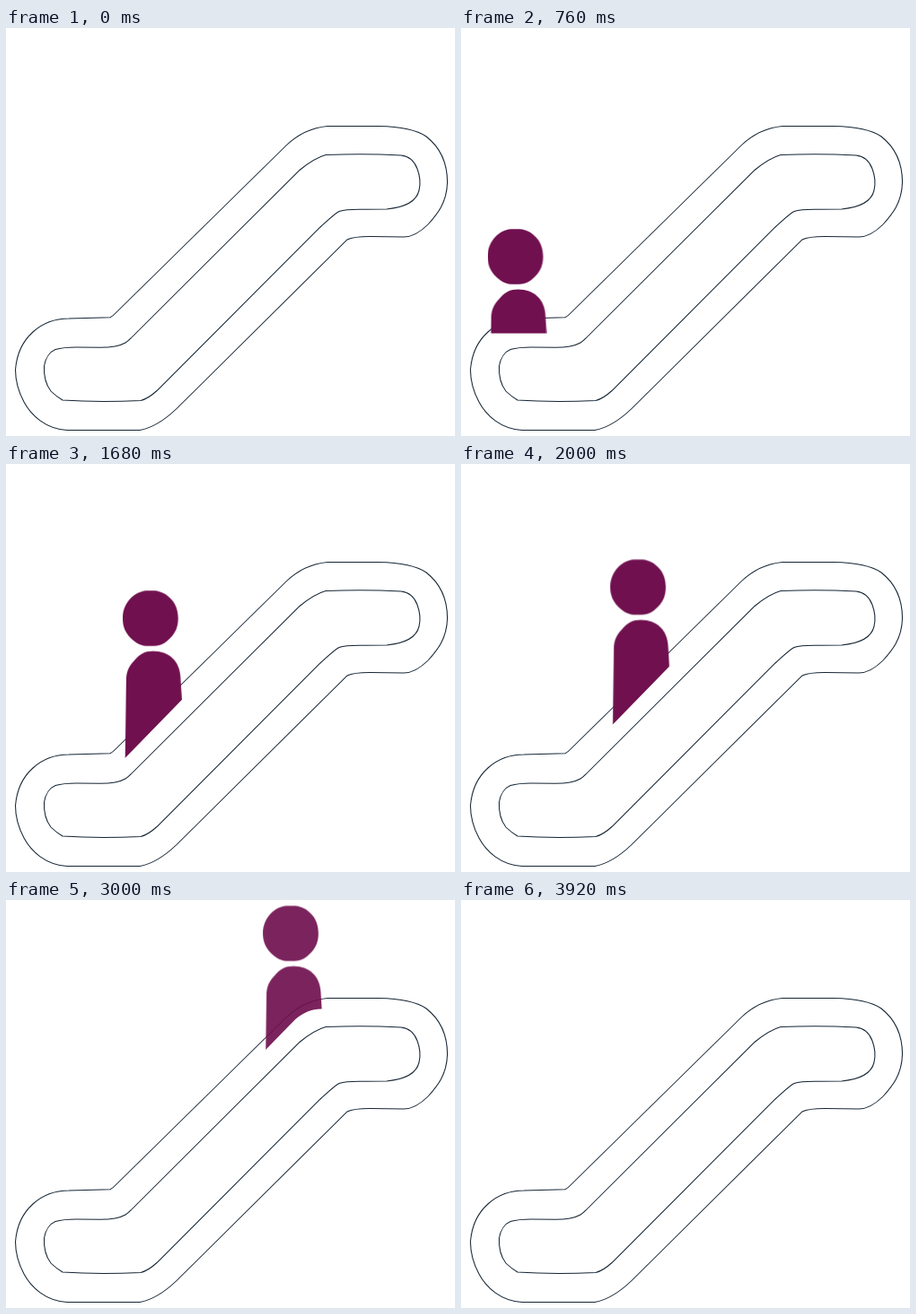
These frames come from a looping animation (500x455 px, 4 s). An HTML page:

```html
<!DOCTYPE html>
<html lang="en">
<head>
<meta charset="utf-8">
<title>Escalator</title>
<style>
  html, body { margin: 0; width: 100%; height: 100%; overflow: hidden; background: #fff; }
  svg { display: block; width: 500px; height: 455px; }
  .rail { fill: none; stroke: #152534; stroke-width: 1.05; }
  .rider {
    fill: #70104f;
    animation: ride 4s linear infinite, fade 4s linear infinite;
  }
  /* walk on, ride up, walk off */
  @keyframes ride {
    0% { transform: translate(-6px, 255px); }
    23% { transform: translate(74.5px, 255px); }
    73% { transform: translate(301.5px, 37.3px); }
    98%, 100% { transform: translate(494px, 37.3px); }
  }
  @keyframes fade {
    0% { opacity: 0; }
    13%, 73% { opacity: 1; }
    98%, 100% { opacity: 0; }
  }
</style>
</head>
<body>
<svg viewBox="0 0 500 455">
  <defs>
    <clipPath id="above">
      <path d="M9.5 0V340.5H107C118 340 126 334 133 327.5L322 133.3C331 125.5 340 121.5 351 121.5H491V0Z"/>
    </clipPath>
  </defs>
  <g class="rail">
    <path d="M116 322.8C118 321.8 120 320 122 318L312 131C325 118.5 342 111 358 109.5H415C440 110 458 114 468 121C482 132 491.5 149 491.5 172C491 195 480 208 470 219C461 228 452 233 443 233L405 232.5C392 232.5 384 234 380 236L190 424.5C178 436 163 446 149 448.5H68C44 447 28 432 20 417C13 404 10.5 394 10.5 381C12 362 20 348 30 339C42 328 57 324 70 324Z"/>
    <path d="M133 351C136 349.3 138 347 140 345L327 158.5C336 151 347 144 356 141.5C383 140.5 412 140.5 440 142C449 143 455 149 458 157C461 165 461.5 175 460 181C457 194 444 200 424 202L400 202.3C388 202 377 202.5 371 204.5C366 207 360 213 350 222L168 404.5C162 410 156 414 150 415.5C120 416.8 90 416.8 63 415C58 412 54 409 50 405C43 396 42 387 42.5 377C44 368 49 361 55 358.5C64 356 70 356 78 356L105 356.3C118 356.3 127 354.5 133 351Z"/>
  </g>
  <g clip-path="url(#above)">
    <g class="rider">
      <path d="M-5 -30.8H5C12 -30.3 18 -27 22 -22.5C28 -17 30.8 -9 30.8 0C30.8 9 28 16 22 22C17 27 12 30.5 4 30.8H-5C-12 30 -17 27 -22 22C-28 16 -31 9 -31 0C-31 -9 -28 -16 -22.5 -22C-18 -27 -12 -30.3 -5 -30.8Z"/>
      <path d="M-28.8 200L-27 67C-26.5 58 -23 52 -18 47C-12 39.5 -6 36.5 3 36.5C21 36.5 32.5 48 33.4 65L35 92V200Z"/>
    </g>
  </g>
</svg>
</body>
</html>
```
